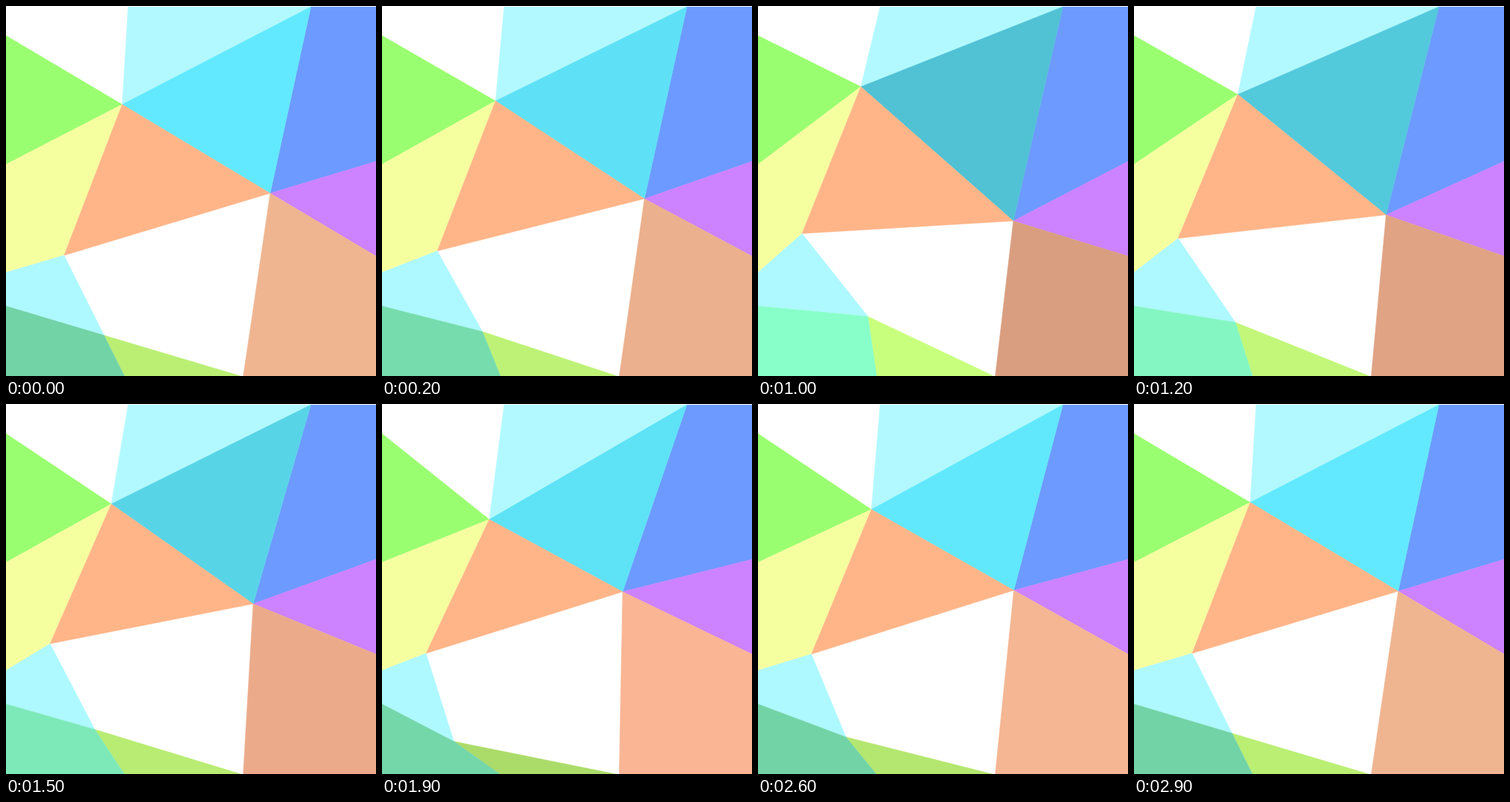
Write an HTML page with a canvas that moves like this. It is 500x500 px and loops after 3000 ms.

```html
<!DOCTYPE html>
<html>
<head>
<meta charset="utf-8">
<style>
html, body { margin: 0; width: 100%; height: 100%; overflow: hidden; background: #fff; }
canvas { display: block; }
</style>
</head>
<body>
<canvas id="stage" width="500" height="500"></canvas>
<script>
const ctx = document.getElementById('stage').getContext('2d');
const STEP = 100, STEPS = 30;
const keyTimes = [0, 10, 20, 29];

// Each track holds three poses; the last segment returns to the first.
const points = {
  p: [[157, 133], [139, 109], [145.6, 161.2]],
  q: [[357, 253], [345, 290.5], [323, 249.6]],
  r: [[78.5, 337], [59.5, 307.5], [59.5, 340.3]],
  s: [[132.5, 445], [148.5, 419.5], [91.5, 460]]
};
const colors = {
  cyan: [[98, 233, 255], [80, 194, 212], [95, 229, 250]],
  brown: [[239, 181, 145], [217, 158, 127], [253, 184, 150]],
  teal: [[114, 211, 166], [136, 255, 201], [114, 211, 166]],
  lime: [[186, 239, 116], [200, 255, 125], [168, 216, 104]]
};

function sample(track, step) {
  const i = step < 10 ? 0 : step < 20 ? 1 : 2;
  const k = (step - keyTimes[i]) / (keyTimes[i + 1] - keyTimes[i]);
  const to = track[(i + 1) % 3];
  return track[i].map((v, n) => v + (to[n] - v) * k);
}

function poly(color, ...pts) {
  ctx.fillStyle = ctx.strokeStyle = color;
  ctx.beginPath();
  pts.forEach(pt => ctx.lineTo(...pt));
  ctx.closePath();
  ctx.fill();
  ctx.stroke(); // hides seams between neighbours
}

function draw(step) {
  const [p, q, r, s] = Object.values(points).map(t => sample(t, step));
  const [cyan, brown, teal, lime] = Object.values(colors)
    .map(t => `rgb(${sample(t, step).map(Math.round)})`);
  const topLeft = [165, 1], topRight = [412, 1];
  const left = [40, 214, 360, 405.5].map(y => [0, y]);
  const right = [210, 338].map(y => [500, y]);
  const bottomLeft = [160.5, 501], bottomRight = [320.5, 501];

  ctx.clearRect(0, 0, 500, 500);
  ctx.lineWidth = 0.5;
  poly('#b2f9ff', topLeft, topRight, p);
  poly('#9aff70', left[0], p, left[1]);
  poly('#f6ffa0', left[1], p, r, left[2]);
  poly('#aef8ff', left[2], r, s, left[3]);
  poly('#6d9aff', topRight, [500, 1], right[0], q);
  poly('#cd82ff', q, ...right);
  poly(brown, q, right[1], [500, 501], bottomRight);
  poly(cyan, p, topRight, q);
  poly('#ffb588', p, q, r);
  poly(lime, s, bottomRight, bottomLeft);
  poly(teal, left[3], s, bottomLeft, [0, 501]);
  ctx.clearRect(0, 0, 500, 1);
}

function tick() {
  draw(Math.floor(performance.now() / STEP) % STEPS);
  requestAnimationFrame(tick);
}
tick();
</script>
</body>
</html>
```
